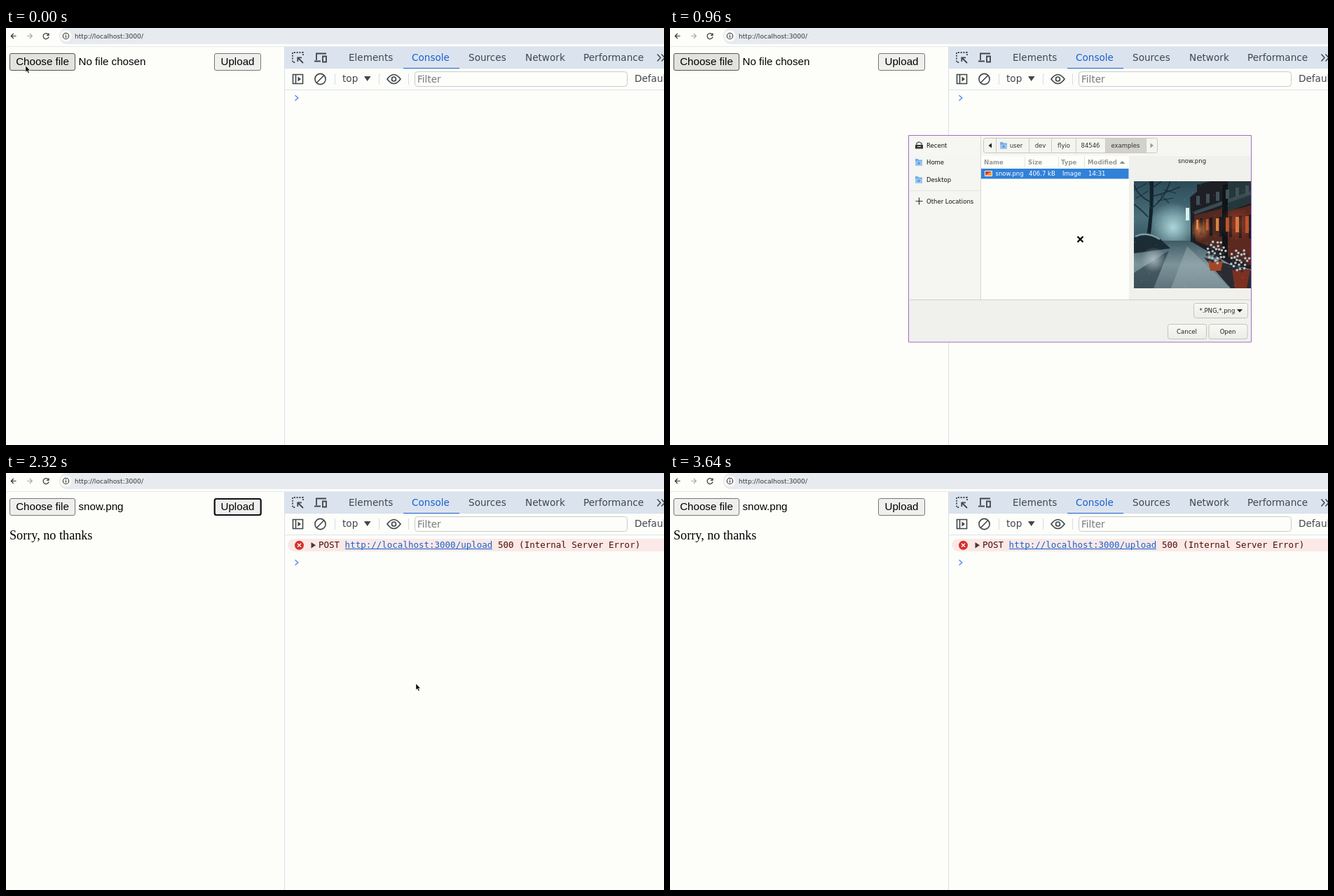
An HTML page with a canvas that plays this animation: 939 by 596 pixels, repeating every 4440 ms.

```html
<!DOCTYPE html>
<html lang="en">
<head>
<meta charset="utf-8">
<title>Upload rejected</title>
<style>
  html, body { margin: 0; width: 100%; height: 100%; overflow: hidden; background: #fdfdfa; }
  canvas { display: block; }
</style>
</head>
<body>
<canvas id="stage" width="939" height="596"></canvas>
<script>
const ctx = document.getElementById('stage').getContext('2d');
const LOOP = 4440, TICK = 40;
const PAGE = '#fdfdfa', INK = '#41464b', BLUE = '#1a5fd0';
const UI = '"DejaVu Sans", sans-serif';
const TAB = '13.6px ' + UI, SMALL = '8.5px ' + UI, HEAD = 'bold 8.6px ' + UI;
const FORM = '15.15px "Liberation Sans", Arial, sans-serif';
const MONO = '12.5px "DejaVu Sans Mono", monospace';

function text(str, x, y, font, color = '#111', align = 'left') {
  ctx.font = font;
  ctx.fillStyle = color;
  ctx.textAlign = align;
  ctx.fillText(str, x, y);
}
function rect(x, y, w, h, color) {
  ctx.fillStyle = color;
  ctx.fillRect(x, y, w, h);
}
function box(x, y, w, h, radius, fill, stroke, width = 1) {
  ctx.beginPath();
  ctx.roundRect(x, y, w, h, radius);
  paint(fill, stroke, width);
}
function paint(fill, stroke, width = 1) {
  if (fill) { ctx.fillStyle = fill; ctx.fill(); }
  if (stroke) { ctx.strokeStyle = stroke; ctx.lineWidth = width; ctx.stroke(); }
}
function path(d, fill, stroke, width, x = 0, y = 0) {
  const shape = new Path2D(d);
  ctx.save();
  ctx.translate(x, y);
  if (fill) { ctx.fillStyle = fill; ctx.fill(shape); }
  if (stroke) { ctx.strokeStyle = stroke; ctx.lineWidth = width; ctx.stroke(shape); }
  ctx.restore();
}
function circle(x, y, r, fill, stroke, width) {
  ctx.beginPath();
  ctx.arc(x, y, r, 0, 7);
  paint(fill, stroke, width);
}
function gradient(x0, y0, x1, y1, ...colors) {
  const g = ctx.createLinearGradient(x0, y0, x1, y1);
  colors.forEach((c, i) => g.addColorStop(i / (colors.length - 1), c));
  return g;
}
function glow(x, y, r, rgb, alpha) {
  const g = ctx.createRadialGradient(x, y, 0, x, y, r);
  g.addColorStop(0, `rgba(${rgb},${alpha})`);
  g.addColorStop(1, `rgba(${rgb},0)`);
  circle(x, y, r, g);
}

function drawAddressBar() {
  box(76, 0, 880, 23, 11, '#e7ebf0');
  rect(0, 26, 939, 1, '#e8ebec');
  path('M14.5 11.5H7.5M10.8 8L7.3 11.5L10.8 15', null, '#333', 1.2);
  path('M30 11.5H37M33.8 8L37.3 11.5L33.8 15', null, '#aaa', 1.2);
  path('M60.3 9.2A4 4 0 1 0 61 12.5M61 7.5V10.3H58', null, '#333', 1.2);
  circle(85.5, 11.5, 8, PAGE);
  circle(85.5, 11.5, 4.2, null, '#333', 1.1);
  path('M85.5 11V14M85.5 9V10.2', null, '#333', 1.1);
  text('http://localhost:3000/', 98, 15, '9.1px ' + UI, '#333');
}

function drawDevtools(failed) {
  rect(398, 27, 541, 31, '#dbe4ee');
  rect(397, 27, 1, 569, '#d6dfea');
  rect(398, 57, 541, 1, '#d5dee9');
  rect(398, 88, 541, 1, '#dce4ec');
  [['Elements', 489], ['Console', 579], ['Sources', 660], ['Network', 741], ['Performance', 824]]
    .forEach(([name, x]) => text(name, x, 47, TAB, name === 'Console' ? BLUE : INK));
  rect(567, 57, 80, 1, BLUE);
  path('M929.5 37.5L934 42.5L929.5 47.5M935.5 37.5L940 42.5L935.5 47.5', null, INK, 1.5);

  ctx.setLineDash([2, 1.8]);
  path('M424 39V35H409V49H413', null, INK, 1.8);
  ctx.setLineDash([]);
  path('M424 50L416.5 42.5M416.3 48V42.3H422', null, INK, 1.8);
  path('M457 36.5H443V46M440 47.5H449', null, INK, 1.8);
  path('M452 40.5H457V48.5H452Z', null, INK, 1.8);

  path('M409.5 66.5H423.5V79.5H409.5ZM413.5 66.5V79.5', null, INK, 1.6);
  path('M416.5 69.5L421 73L416.5 76.5Z', INK);
  circle(448.5, 73, 7.6, null, INK, 1.6);
  path('M443 78.5L454 67.5', null, INK, 1.6);
  [469, 532, 574].forEach(x => rect(x, 65, 1, 16, '#d3deeb'));
  text('top', 480, 77, TAB, INK);
  path('M511 69H520.5L515.7 76Z', INK);
  path('M544 73Q553.5 60 563 73Q553.5 86 544 73Z', null, INK, 1.6);
  circle(553.5, 73, 3, null, INK, 1.7);
  box(583.5, 62.5, 303, 21, 4, null, '#c9ccc9');
  text('Filter', 587, 78, TAB, '#777b7d');
  text('Default levels', 897, 77, TAB, INK);

  path('M412.5 -3.7L416.8 0L412.5 3.7', null, '#4a8af0', 1.4, 0, failed ? 128 : 100);
  if (!failed) return;
  box(402, 94, 550, 18, 9, '#fae9e6');
  circle(418.5, 103.3, 6.5, '#d8302c');
  path('M416 100.8L421 105.8M421 100.8L416 105.8', null, '#fff', 1.3);
  path('M435.5 99L442 103.2L435.5 107.5Z', '#4a3a38');
  text('POST', 446, 107, MONO, '#4b0d0a');
  text('http://localhost:3000/upload', 483.6, 107, MONO, BLUE);
  rect(484, 108, 210, 1, BLUE);
  text('500 (Internal Server Error)', 702, 107, MONO, '#4b0d0a');
}

function drawButton(label, x, w, state, focused) {
  const [fill, edge] = {
    idle: ['#efefed', '#777'], hover: ['#e2e3de', '#555'], active: ['#f6f6f4', '#8d8d8d']
  }[state];
  box(x + .5, 36.5, w - 1, 24, 2.5, fill, edge);
  if (focused) box(x + .7, 37, w - 1, 23, 2.5, null, '#101014', 2.2);
  text(label, x + w / 2, 53, FORM, '#000', 'center');
}

function drawPage(t) {
  const picked = t >= 1240, pressed = t >= 2040 && t < 2240;
  const chooseState = picked ? 'idle' : t >= 40 && t < 120 ? 'active' : 'hover';
  drawButton('Choose file', 5, 94, chooseState);
  text(picked ? 'snow.png' : 'No file chosen', 103.5, 53, FORM, '#000');
  drawButton('Upload', 297, 67, pressed ? 'active' : 'idle', t >= 1680 && t < 3280);
  if (t >= 2280) text('Sorry, no thanks', 5, 95, '18.18px "Liberation Serif", Times, serif', '#000');
}

// A snowy street at night, in flat shapes and soft light.
function drawPhoto(right) {
  ctx.save();
  ctx.beginPath();
  ctx.rect(662, 219, right - 662, 153);
  ctx.clip();
  rect(662, 219, 180, 153, gradient(0, 219, 0, 372, '#2b4a57', '#4a6f7b', '#2c4752', '#5b737c'));
  glow(718, 285, 36, '190,235,236', .85);

  // Snow on the ground, with darker tracks towards the viewer.
  path('M662 316L700 304H748L842 345V372H662Z', gradient(0, 304, 0, 372, '#3f5a64', '#7d939a', '#5d747c'));
  path('M662 350L712 318L690 372H662Z', 'rgba(30,48,57,.55)');
  path('M715 372L738 312L800 372Z', 'rgba(165,184,190,.4)');
  path('M762 328L842 350V372H800Z', '#2a2c31');

  // Bare trees.
  path('M684 219Q687 260 678 310H684Q691 260 690 219Z', '#12222a');
  const branch = '#1b303a';
  path('M686 258Q704 247 714 219M686 249Q668 240 662 224M688 241Q706 236 728 227M682 270Q671 258 662 252M689 228L702 219',
    null, branch, 1.8);
  path('M662 232L680 222M664 244L682 233M696 247L718 243M700 238L712 250M704 231L722 236', null, branch, 1.2);

  // Brick houses in steep perspective.
  path('M742 242L752 234V224L772 219H842V348L800 338L745 306Z', '#1d1f25');
  path('M748 268L788 258V320L750 304Z', '#54291f');
  path('M796 262L842 250V344L796 326Z', '#5c281f');
  path('M796 219H842V246L796 262Z', '#24373a');
  path('M748 262L842 228V234L748 267Z', '#3a4b51');
  path('M788 225L796 222V328L788 322Z', '#0f1419');
  for (let i = 0; i < 6; i++) {
    const x = 751 + i * 14, top = 274 - i;
    rect(x, top, 3 + i * .6, 14 + i * 2, i % 2 ? '#b4532c' : '#d98445');
    rect(x + 5, top - 2, 4, 24 + i * 2, '#191a1f');
    rect(x, 240 - i * 3, 5, 13, '#425158');
  }
  glow(756, 288, 16, '255,150,80', .6);
  glow(808, 280, 24, '228,92,48', .4);
  rect(736, 257, 5, 18, '#d8f0ee');
  rect(743, 262, 2, 44, '#14232a');

  // Parked car under snow, and a drift.
  path('M662 300Q676 288 698 300L714 315L662 322Z', '#1b2c35');
  path('M664 298Q680 290 699 302', null, '#7f9ca4', 2.5);
  glow(690, 331, 18, '178,194,198', .85);

  // Snow-topped flower pots.
  path('M768 333H789L786 347H771Z', '#a4462a');
  path('M802 345H828L823 372H806Z', '#7b3022');
  for (let i = 0; i < 70; i++) {
    const a = i * 2.4, r = 2.4 * Math.sqrt(i % 35);
    const x = (i < 35 ? 779 : 813) + r * Math.cos(a);
    const y = (i < 35 ? 320 : 332) + r * 1.2 * Math.sin(a);
    circle(x, y, 1.8, i % 3 ? '#b9c3c6' : '#2b3135');
  }
  for (let i = 0; i < 80; i++)
    circle(662 + i * 61.8 % 175, 219 + i * 37.7 % 153, .5, 'rgba(210,230,234,.45)');
  ctx.restore();
}

function folder(x, y) {
  path('M0 0H4L5 1.5H10V10H0Z', '#78aee4', null, 0, x, y);
  rect(x, y + 3.5, 10, 6.5, '#9ac7f2');
  rect(x + 3.5, y + 5, 3, 3, '#5d95d0');
}
function softButton(label, x, y, w) {
  box(x + .5, y + .5, w, 21, 3, gradient(0, y, 0, y + 22, '#f8f8f5', '#ececE8'), '#c5c5bd');
  text(label, x + w / 2, y + 14, SMALL, '#222', 'center');
}

function drawDialog(t) {
  // The window creeps wider by one pixel per tick before it closes.
  const grow = Math.max(0, (t - 920) / TICK), right = 828 + grow;
  rect(341, 153, right - 341, 296, '#f0f0ec');
  rect(341, 153, right - 341, 30, '#f6f6f2');
  rect(341, 183, 103, 205, '#f5f5f1');
  rect(444, 183, 211, 205, PAGE);
  rect(443, 154, 1, 234, '#d9d9d3');
  rect(342, 388, right - 342, 1, '#d0d0c9');
  rect(342, 232, 101, 1, '#e6e6e0');

  path('M352 168V164.5L355 162.8L359 164.5V168', null, '#333', 1.1);
  path('M350 167H361V172.5H350Z', '#333');
  path('M353 169.5H358', null, '#eee', 1);
  folder(350, 187);
  folder(350, 212);
  path('M350.5 247.5H360.5M355.5 242.5V252.5', null, '#333', 1.2);
  [['Recent', 171], ['Home', 195], ['Desktop', 220], ['Other Locations', 251]]
    .forEach(([name, y]) => text(name, 366, y, SMALL));

  box(447.5, 157.5, 248, 21, 3, '#f4f4f0', '#c9c9c2');
  rect(621, 158, 58, 20, '#d2d1cb');
  [465, 512, 544, 579, 621, 679].forEach(x => rect(x, 158, 1, 20, '#cdcdc6'));
  path('M459 164.5V171.5L454.5 168Z', '#222');
  const fade = Math.min(1, Math.max(0, (t - 600) / 200));
  const shade = Math.round(34 + 120 * fade);
  path('M685.5 164.5V171.5L690 168Z', `rgb(${shade},${shade},${shade})`);
  folder(471, 163);
  [['user', 494], ['dev', 528.5], ['flyio', 562], ['84546', 600], ['examples', 650]]
    .forEach(([name, x]) => text(name, x, 171, SMALL, '#333', 'center'));

  [['Name', 448], ['Size', 511], ['Type', 558], ['Modified', 596]]
    .forEach(([name, x]) => text(name, x, 195, HEAD, '#999994'));
  path('M641.5 194H649.5L645.5 190Z', '#8b8b87');
  [506, 554, 591].forEach(x => rect(x, 184, 1, 15, '#e2e2dc'));
  rect(444, 201, 210.5, 14.5, '#3081d9');
  box(449, 204, 11, 8, 1, '#eee');
  path('M450 205H459L450 211Z', '#d33f25');
  path('M459 205V211H450Z', '#f29a35');
  [['snow.png', 464.5], ['406.7 kB', 512], ['Image', 560], ['14:31', 597]]
    .forEach(([name, x]) => text(name, x, 211, SMALL, '#fff'));

  text('snow.png', 745, 193, SMALL, '#222', 'center');
  drawPhoto(right);
  softButton('', 746 + grow, 393, 77);
  text('*.PNG,*.png', 754.5 + grow, 407, SMALL, '#222');
  path('M808 402H816L812 406.5Z', '#222', null, 0, grow);
  softButton('Cancel', 709 + grow, 423, 55);
  softButton('Open', 767.5 + grow, 423, 55);
  box(340.5, 153.5, right - 340, 295.5, 0, null, '#a06fc2');
}

function drawArrow(x, y) {
  path('M0 0V9L2 7.2L3.6 10.6L5.2 9.8L3.6 6.7H6.4Z', '#000', '#fff', .5, x, y);
}
function drawPointer(t) {
  if (t < 240) drawArrow(28, 54);
  else if (t < 1200) {
    path('M581.5 298L589.5 306M589.5 298L581.5 306', null, '#fff', 3.4);
    path('M581.5 298L589.5 306M589.5 298L581.5 306', null, '#000', 2.3);
  } else if (t < 3040) drawArrow(585, 301);
  else if (t < 3320) {
    const p = ((t - 3040) / 280) ** 1.6;
    drawArrow(587 + 355 * p, 301 + 180 * p);
  }
}

function frame(now) {
  const t = Math.floor(now % LOOP / TICK) * TICK;
  rect(0, 0, 939, 596, PAGE);
  drawAddressBar();
  drawDevtools(t >= 2280);
  drawPage(t);
  if (t >= 240 && t < 1200) drawDialog(t);
  drawPointer(t);
}
const start = performance.now();
function play(now) {
  frame(Math.max(0, now - start));
  requestAnimationFrame(play);
}
requestAnimationFrame(play);
</script>
</body>
</html>
```
